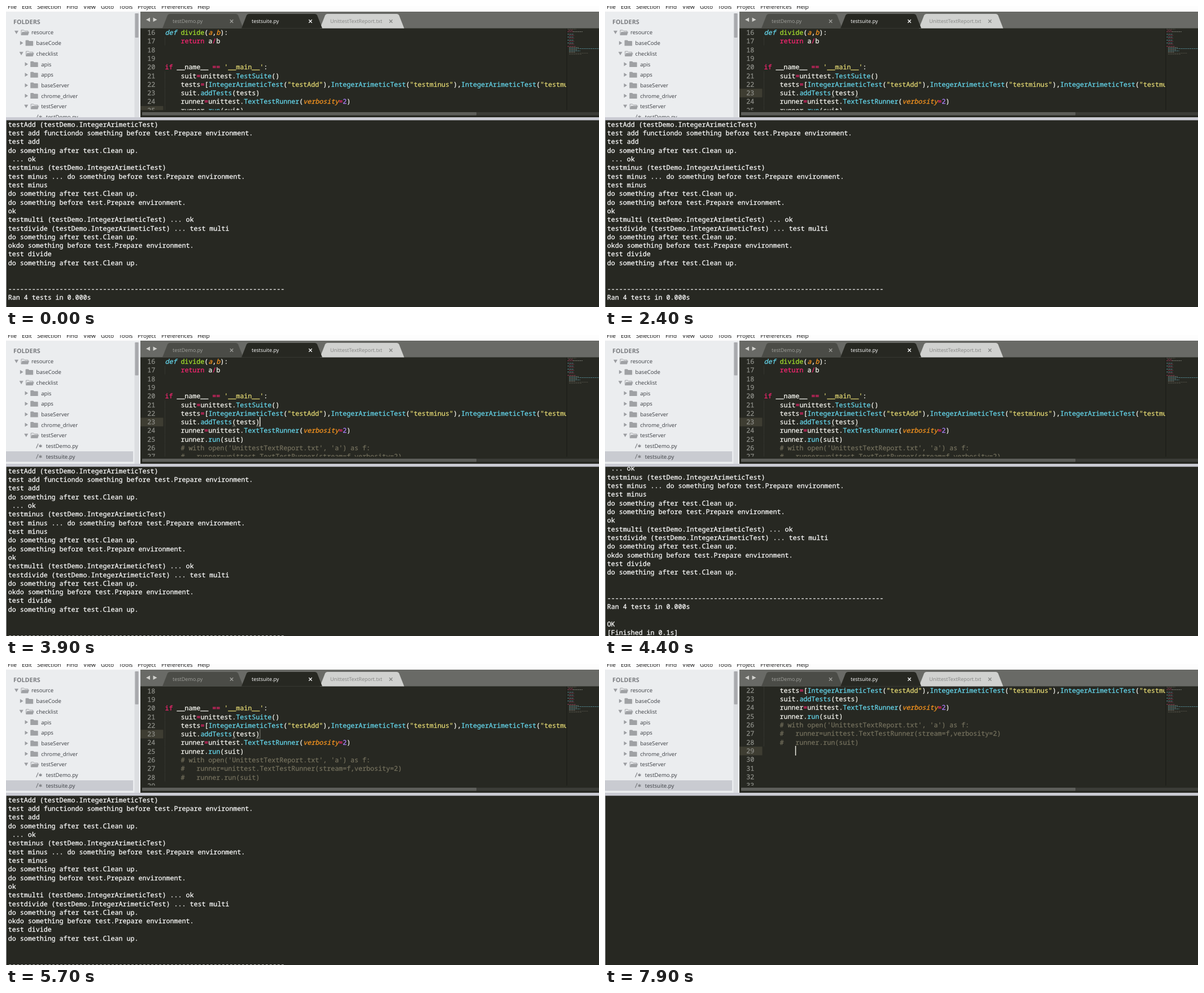
Animation of 1050x533 px, one loop 8 s. Source, as an HTML page:

```html
<!DOCTYPE html>
<html lang="en">
<head>
<meta charset="utf-8">
<title>Test run in a code editor</title>
<style>
@property --drag { syntax: '<number>'; inherits: true; initial-value: 0; }
@property --row { syntax: '<number>'; inherits: true; initial-value: 25; }

html, body { margin: 0; width: 100%; height: 100%; overflow: hidden; background: #272822; }
svg {
  display: block; width: 100vw; height: 100vh;
  --loop: 8s step-end infinite;
  animation: drag var(--loop), row var(--loop);
}
text { white-space: pre; text-rendering: geometricPrecision; }
.ui { font-family: 'Open Sans', sans-serif; font-size: 9.6px; fill: #3c3f44; }
.ui.menu { font-size: 10.05px; fill: #111; }
.ui.tab { font-size: 9px; }
.ui.head { font-size: 10.8px; font-weight: 700; fill: #7c7e82; }
.mono { font-family: 'Noto Sans Mono', monospace; font-size: 11.667px; color: #f8f8f2; }
.mono, .mono tspan { fill: currentColor; stroke: currentColor; stroke-width: .25px; }
.log { color: #fff; }
.num { color: #8f908a; }
.comment { color: #75715e; }
.string { color: #e6db74; }
.key { color: #f92672; }
.def { color: #66d9ef; font-style: italic; }
.call { color: #66d9ef; }
.name { color: #a6e22e; }
.arg { color: #fd971f; font-style: italic; }
.digit { color: #ae81ff; }

#pane { transform: translateY(calc(var(--drag) * 1px)); }
#thumb { height: calc(43px + var(--drag) * .5px); }
#rowMark { transform: translateY(calc((var(--row) - 16) * 15.31px)); }
#code { animation: codeScroll var(--loop); }
#log { animation: logScroll var(--loop), clear var(--loop); }
#splitter { animation: grip var(--loop); }
#caretA { animation: blinkA var(--loop); }
#caretB { animation: blinkB var(--loop); }
#brackets { animation: brackets var(--loop); }

@keyframes drag {
  0% { --drag: 0; } 33.75% { --drag: 9; } 35% { --drag: 18; } 36.25% { --drag: 26; }
  43.75% { --drag: 27; } 45% { --drag: 28; } 46.25% { --drag: 29; } 47.5% { --drag: 30; }
  48.75%, 100% { --drag: 31; }
}
@keyframes row {
  0% { --row: 25; } 10% { --row: 23; } 81.25%, 100% { --row: 29; }
}
@keyframes grip {
  0% { fill: #cacbd3; } 33.75% { fill: #c1c9d1; } 48.75%, 100% { fill: #cacbd3; }
}
@keyframes codeScroll {
  0% { transform: none; } 71.25% { transform: translateY(-30px); } 72.5% { transform: translateY(-62px); }
  73.75% { transform: translateY(-84px); } 75%, 100% { transform: translateY(-92px); }
}
@keyframes logScroll {
  0% { transform: none; }
  52.5% { transform: translateY(-24px); } 53.75% { transform: translateY(-48px); }
  55% { transform: translateY(-65.6px); }
  58.75% { transform: translateY(-54px); } 60% { transform: translateY(-38px); }
  61.25% { transform: translateY(-24px); } 62.5% { transform: translateY(-12.8px); }
  63.75% { transform: translateY(-6px); } 65% { transform: translateY(-2px); }
  66.25%, 100% { transform: none; }
}
@keyframes clear { 0% { visibility: visible; } 98.75%, 100% { visibility: hidden; } }
@keyframes brackets { 0% { opacity: 0; } 10% { opacity: .6; } 81.25%, 100% { opacity: 0; } }
@keyframes blinkA {
  0% { opacity: 0; } 10% { opacity: 1; }
  15%, 27.5%, 52.5%, 76.25% { opacity: .6; }
  16.25%, 28.75%, 53.75%, 77.5% { opacity: .2; }
  17.5%, 30%, 41.25%, 55%, 66.25% { opacity: 0; }
  23.75% { opacity: 1; } 26.25% { opacity: .85; }
  33.75%, 46.25%, 58.75%, 71.25% { opacity: .3; }
  35%, 47.5%, 60%, 72.5% { opacity: .7; }
  36.25%, 48.75%, 61.25%, 73.75% { opacity: 1; }
  40%, 65% { opacity: .4; }
  81.25%, 100% { opacity: 0; }
}
@keyframes blinkB {
  0% { opacity: 0; } 81.25% { opacity: 1; }
  87.5% { opacity: .6; } 88.75% { opacity: .25; } 90% { opacity: 0; }
  95% { opacity: .5; } 96.25%, 100% { opacity: 1; }
}
</style>
</head>
<body>
<svg id="stage" viewBox="0 0 1050 533" preserveAspectRatio="none"></svg>
<script>
const PITCH = 15.31, CHAR = 7, CODE_X = 281, FIRST = 16;

const rect = (x, y, w, h, fill, extra = '') =>
  `<rect x="${x}" y="${y}" width="${w}" height="${h}" fill="${fill}" ${extra}/>`;
const path = (d, fill, extra = '') => `<path d="${d}" fill="${fill}" ${extra}/>`;
const text = (x, y, cls, body, extra = '') =>
  `<text x="${x}" y="${y}" class="${cls}" ${extra}>${body}</text>`;

// Sidebar
const down = (x, y) => path(`M${x} ${y - 3}h7l-3.5 6z`, '#9b9da1');
const right = (x, y) => path(`M${x} ${y - 3.5}v7l5.5-3.5z`, '#9b9da1');
const folder = (x, y) => path(`M${x} ${y + 5}v-9q0-1 1-1h4l1.5 1.5h6q1 0 1 1v7.5z`, '#9fa1a4');
const openFolder = (x, y) =>
  path(`M${x + .5} ${y + 4}v-8h4.5l1.5 1.5h6v2.5`, 'none', 'stroke="#9fa1a4"') +
  path(`M${x} ${y + 5}l2.2-6h12.3l-2 6z`, '#9fa1a4');
const fileIcon = (x, y) =>
  path(`M${x} ${y + 4}l3.6-8.2M${x + 7.5} ${y - 2.8}v5.6m-2.6-4.2l5.2 2.8m0-2.8l-5.2 2.8`,
    'none', 'stroke="#77797d" stroke-width="1.1"');

const tree = [
  [0, 'resource', 'open'], [1, 'baseCode'], [1, 'checklist', 'open'], [2, 'apis'], [2, 'apps'],
  [2, 'baseServer'], [2, 'chrome_driver'], [2, 'testServer', 'open'],
  [3, 'testDemo.py', 'file'], [3, 'testsuite.py', 'file']
];

function treeRow([depth, label, kind], i) {
  const y = 46.8 + i * 18.72, x = depth * 8.6;
  const icon = kind === 'file' ? fileIcon(53.5, y)
    : kind === 'open' ? down(15 + x, y) + openFolder(26.5 + x, y)
    : right(16.3 + x, y) + folder(26 + x, y);
  return icon + text(45 + x, y + 3.6, 'ui', label);
}

const sidebar = rect(0, 10, 238, 523, '#ebedef') +
  rect(227.5, 13, 8, 520, '#dcdee1') +
  rect(228.5, 13, 6, 43, '#a8a9ad', 'id="thumb" rx="1"') +
  rect(0, 206, 225, 18.5, '#c9cbd1') +
  text(13, 32, 'ui head', 'FOLDERS') + tree.map(treeRow).join('');

// Tabs
const cross = (x, color) =>
  path(`M${x - 2.7} 24.3l5.4 5.4m0-5.4l-5.4 5.4`, 'none', `stroke="${color}" stroke-width="1.3"`);
const tab = (x, w, label, fill, ink, closeX) =>
  path(`M${x} 39.5L${x + 9} 16.5Q${x + 10} 14 ${x + 13} 14H${x + w - 13}Q${x + w - 10} 14 ${x + w - 9} 16.5L${x + w} 39.5z`, fill) +
  text(x + 18, 30.3, 'ui tab', label, `style="fill:${ink}"`) + cross(closeX, ink);

const tabs = rect(238, 10, 812, 29.5, '#696a66') +
  path('M255 20.5v7.5l-7-3.75zM260.5 20.5v7.5l7-3.75z', '#d2d2ce') +
  tab(277, 143, 'testDemo.py', '#4b4c47', '#a0a19c', 399.5) +
  tab(556, 149, 'UnittestTextReport.txt', '#d0d1cf', '#858684', 681.5) +
  tab(417, 143, 'testsuite.py', '#272822', '#fff', 539);

const menus = [[3, 'File'], [28, 'Edit'], [55, 'Selection'], [107, 'Find'], [137, 'View'], [168, 'Goto'],
  [200, 'Tools'], [233, 'Project'], [275, 'Preferences'], [339, 'Help']];
const menuBar = rect(0, 0, 1050, 10, '#fdfdfd') +
  menus.map(([x, label]) => text(x, 5.3, 'ui menu', label)).join('');

// Code
const source = `def divide(a,b):
    return a/b


if __name__ == '__main__':
    suit=unittest.TestSuite()
    tests=[IntegerArimeticTest("testAdd"),IntegerArimeticTest("testminus"),IntegerArimeticTest("testmulti")]
    suit.addTests(tests)
    runner=unittest.TextTestRunner(verbosity=2)
    runner.run(suit)
    # with open('UnittestTextReport.txt', 'a') as f:
    #   runner=unittest.TextTestRunner(stream=f,verbosity=2)
    #   runner.run(suit)`.split('\n');

const token = new RegExp([
  '(?<comment>#.*)', '(?<string>"[^"]*"|\'[^\']*\')', '(?<def>\\bdef\\b)',
  '(?<key>\\b(?:if|return)\\b|=+|/)', '(?<name>\\bdivide\\b)',
  '(?<arg>\\bverbosity\\b|\\b[ab]\\b(?=[,)]))', '(?<digit>\\b\\d+\\b)',
  '(?<call>\\b(?:IntegerArimeticTest|TestSuite|addTests|TextTestRunner|run)(?=\\())'
].join('|'), 'g');

function highlight(line) {
  return line.replace(token, (match, ...rest) => {
    const groups = rest.at(-1);
    const cls = Object.keys(groups).find(key => groups[key] !== undefined);
    return `<tspan class="${cls}">${match}</tspan>`;
  });
}

const baseline = n => 51 + (n - FIRST) * PITCH;
const codeLines = source.map((line, i) => {
  const indent = line.search(/\S/);
  if (indent < 0) return '';
  const y = baseline(FIRST + i);
  const guide = indent ? rect(CODE_X, y - 12, 1, PITCH, '#34352f') : '';
  return guide + text(CODE_X + .4 + indent * CHAR, y, 'mono', highlight(line.trim()));
}).join('');
const numbers = Array.from({ length: 20 }, (_, i) =>
  text(250.3, baseline(FIRST + i), 'mono num', FIRST + i)).join('');
const caret = (id, x, n) => rect(x, baseline(n) - 13, 1.4, 17, '#f8f8f0', `id="${id}"`);
const bracketMark = column => rect(CODE_X + column * CHAR + 1, baseline(23) + 2.5, 5.5, 1, '#c8c8c0');

const code = `<g clip-path="url(#codeArea)"><g id="code">
  ${rect(238, 39.3, 40.5, PITCH, '#3e3d32', 'id="rowMark"')}
  ${numbers}${codeLines}
  <g id="brackets">${bracketMark(17)}${bracketMark(23)}</g>
  ${caret('caretA', 449, 23)}${caret('caretB', 336.8, 29)}
</g></g>`;

// Minimap: x offset, y, width, colour
const PINK = '#a83a5c', GREY = '#8c8d86', BLUE = '#5a99a5', DIM = '#55534a';
const mini = [
  [0, 41, 16, DIM], [2, 43, 8, PINK], [0, 45.5, 10, PINK], [10, 45.5, 17, GREY],
  ...[50, 55, 60.5, 65.5].flatMap(y => [[0, y, 11, BLUE], [3, y + 2, 9, PINK]]),
  [0, 71.5, 15, PINK], [3, 73.5, 17, GREY], [3, 75.5, 53, BLUE], [3, 77.5, 14, GREY],
  [3, 79.5, 20, BLUE], [3, 81.5, 11, GREY], [3, 83.5, 34, DIM], [3, 85.5, 22, DIM]
];
const minimap = rect(993, 39.5, 57, 494, '#272822') + rect(992, 39.5, 2, 494, '#20211c') +
  mini.map(([x, y, w, color]) =>
    path(`M${994 + x} ${y}h${w}`, 'none', `stroke="${color}" stroke-width="1.1" stroke-dasharray="3 .8" opacity=".75"`)).join('');

// Build output
const log = `testAdd (testDemo.IntegerArimeticTest)
test add functiondo something before test.Prepare environment.
test add
do something after test.Clean up.
 ... ok
testminus (testDemo.IntegerArimeticTest)
test minus ... do something before test.Prepare environment.
test minus
do something after test.Clean up.
do something before test.Prepare environment.
ok
testmulti (testDemo.IntegerArimeticTest) ... ok
testdivide (testDemo.IntegerArimeticTest) ... test multi
do something after test.Clean up.
okdo something before test.Prepare environment.
test divide
do something after test.Clean up.


${'-'.repeat(70)}
Ran 4 tests in 0.000s

OK
[Finished in 0.1s]`.split('\n');

const pane = `<g id="pane">
  ${rect(238, 184.3, 812, 13, '#272822')}
  ${rect(241, 188, 809, 5.5, '#3b3c37')}
  ${rect(241, 188, 592, 5.5, '#5d5e5a', 'rx="1"')}
  ${rect(0, 202, 1050, 340, '#272822')}
  ${rect(0, 202, .8, 340, '#b8b9c0')}
  ${rect(0, 197, 1050, 5.3, '#cacbd3', 'id="splitter"')}
  <g clip-path="url(#logArea)"><g id="log">
    ${log.map((line, i) => text(3.7, 213.8 + i * PITCH, 'mono log', line)).join('')}
  </g></g>
</g>`;

document.getElementById('stage').innerHTML = `<defs>
  <clipPath id="codeArea">${rect(238, 39.5, 755.5, 494, '#000')}</clipPath>
  <clipPath id="logArea">${rect(0, 202.3, 1050, 340, '#000')}</clipPath>
</defs>` + rect(0, 0, 1050, 533, '#272822') + sidebar + code + minimap + tabs + menuBar + pane;
</script>
</body>
</html>
```
